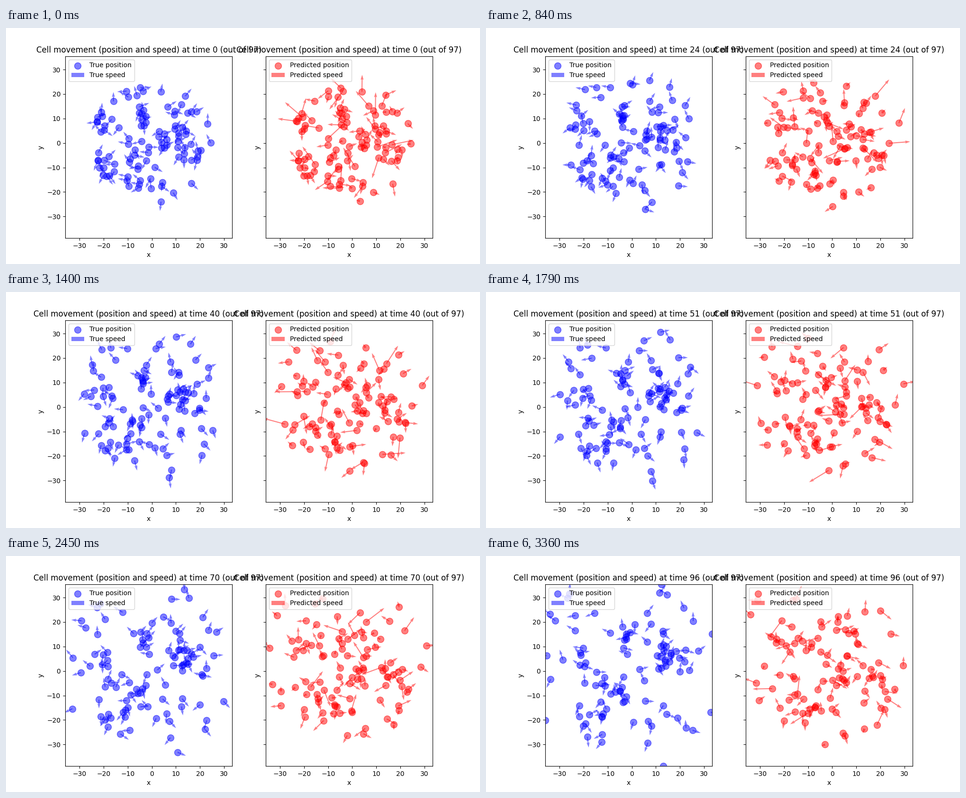
These frames come from a looping animation (1000x500 px, 3.39 s). A matplotlib script:

```python
import numpy as np
import matplotlib.pyplot as plt
from matplotlib.animation import FuncAnimation

STEPS = 97
LOOP_MS = 3390

# Outer cells: start x, y / true end x, y / predicted end x, y
OUTER = np.array([
    (-10.5, 21.2, -26.7, 29.8, -15, 29.5), (-16, 17, -26, 31.5, -31, 29),
    (-21, 12.7, -34, 23.3, -34, 23), (-20.7, 10.9, -31.8, 20.6, -25.5, 14),
    (-22.8, 8.6, -35.5, 6.3, -38, 9.5), (-21.2, 4.5, -33.8, -3.4, -28.3, 2),
    (-22.5, -7.2, -36, -20.1, -40, -2), (-21.8, -10.1, -18.5, -26.9, -31.6, -4.9),
    (-18.8, -13.5, -12.6, -29, -30.5, -12), (3.8, -24, 13, -38.8, -3, -30),
    (8.9, -20.3, 6.6, -29.3, 13.4, -23.6), (16.5, -16.5, 22.5, -23.2, 18.6, -22),
    (20.4, -3, 32.8, -16.8, 23, -11.4), (18.7, -7, 25.2, -24.2, 20.2, -15),
    (18.5, 12.8, 33.4, 15.1, 24.4, 15.2), (23.2, 7.9, 25.5, 20.4, 35, 11),
    (24.4, 0.1, 27.7, 8.2, 29.5, 2.2), (13.9, 19.2, 14.7, 31.2, 20, 24.7),
    (3.7, 21, 12.3, 35.4, 2.5, 22.3), (-3.7, 21.2, 11.5, 32, -4.8, 20.1),
    (-4.8, 22.7, 6.3, 23.7, -16.5, 28.8), (-9.8, 18.8, -23.5, 22.7, -21, 20.6),
    (-6.2, 19.5, -15.6, 23.7, -16.8, 18), (16.4, 12.9, 21.6, 25.8, 13.6, 24.3),
])

# Inner patches: centre x, y, half width, half height, cell count
PATCHES = [
    (12, 14, 5.5, 3, 5), (-3.5, 11, 1.8, 4.5, 9), (-17, 8, 6, 3, 6),
    (12.5, 5, 3, 2.5, 7), (5, 1.5, 2.2, 4, 8), (16, -3, 5.5, 4.5, 10),
    (-4.5, -1.5, 5.5, 4, 7), (-18, -8.5, 4.5, 5.5, 9),
    (-2.5, -8.5, 7, 2.5, 6), (-1, -16, 9.5, 2.8, 10),
]

# Places the inner cells gather around
TRUE_HUBS = np.array([(-8, -7), (2, 14), (14, 8), (10, -19), (-14, -19), (-17, 7)])
PRED_HUBS = np.array([(-9, -14), (0, -3), (16, -5), (5, 16), (-15, 8), (4, -18)])

rng = np.random.default_rng(12)


def fill(cx, cy, w, h, n):
    """Spread n cells evenly over a patch."""
    k = np.arange(1, n + 1)[:, None]
    unit = (0.5 + k * np.array([0.7549, 0.5698])) % 1
    return (cx, cy) + (2 * unit - 1) * (w, h)


def gather(pts, hubs, spread):
    """Pull every cell toward its nearest hub and scatter it."""
    dist = np.linalg.norm(pts[:, None] - hubs[None], axis=2)
    hub = hubs[dist.argmin(axis=1)]
    return 0.45 * hub + 0.72 * pts + rng.normal(0, spread, pts.shape)


class Swarm:
    def __init__(self, start, end, bend, turn, size, swing):
        n = len(start)
        self.start, self.end = start, end
        self.b1 = rng.normal(0, bend, (n, 2))
        self.b2 = rng.normal(0, bend / 2, (n, 2))
        self.phase = rng.uniform(0, 2 * np.pi, (3, n))
        self.rate = rng.uniform(6, 16, n)
        self.turn, self.size, self.swing = turn, size, swing

    def at(self, t):
        a = np.pi * t
        pos = (self.start + (self.end - self.start) * t
               + self.b1 * np.sin(a) + self.b2 * np.sin(2 * a))
        vel = (self.end - self.start + np.pi * self.b1 * np.cos(a)
               + 2 * np.pi * self.b2 * np.cos(2 * a))
        p, q, r = self.phase
        angle = np.arctan2(vel[:, 1], vel[:, 0])
        angle = angle + self.turn * np.sin(self.rate * t + p)
        wave = np.sin(2 * self.rate * t + q) * np.sin(self.rate * t + r)
        length = self.size * np.exp(self.swing * wave)
        return pos, length * np.cos(angle), length * np.sin(angle)


inner = np.vstack([fill(*p) for p in PATCHES])
start = np.vstack([OUTER[:, :2], inner])
true_end = np.vstack([OUTER[:, 2:4], gather(inner, TRUE_HUBS, 3.2)])
pred_end = np.vstack([OUTER[:, 4:], gather(inner, PRED_HUBS, 3.6)])
pred_start = start + rng.normal(0, 0.25, start.shape)

swarms = [Swarm(start, true_end, 1.2, 0.7, 20, 0.15),
          Swarm(pred_start, pred_end, 1.6, 1.0, 20, 0.9)]

fig, axes = plt.subplots(1, 2, figsize=(10, 5), dpi=100, sharey=True)
panels = []
for ax, swarm, name, color in zip(axes, swarms, ("True", "Predicted"), ("blue", "red")):
    pos, u, v = swarm.at(0)
    dots = ax.scatter(*pos.T, s=100, color=color, alpha=0.5,
                      label=f"{name} position")
    arrows = ax.quiver(*pos.T, u, v, color=color, alpha=0.5, scale=1,
                       scale_units="dots", label=f"{name} speed")
    ax.set(xlim=(-36, 33.4), ylim=(-38.8, 35.4), xlabel="x", ylabel="y")
    ax.set_xticks(range(-30, 31, 10))
    ax.set_yticks(range(-30, 31, 10))
    ax.legend(loc="upper left")
    panels.append((ax, swarm, dots, arrows))


def draw(step):
    for ax, swarm, dots, arrows in panels:
        pos, u, v = swarm.at(step / (STEPS - 1))
        dots.set_offsets(pos)
        arrows.set_offsets(pos)
        arrows.set_UVC(u, v)
        ax.set_title("Cell movement (position and speed) "
                     f"at time {step} (out of {STEPS})")
    return []


anim = FuncAnimation(fig, draw, frames=STEPS, interval=LOOP_MS / STEPS,
                     init_func=lambda: draw(0), repeat=True, repeat_delay=0)
plt.show()
```
